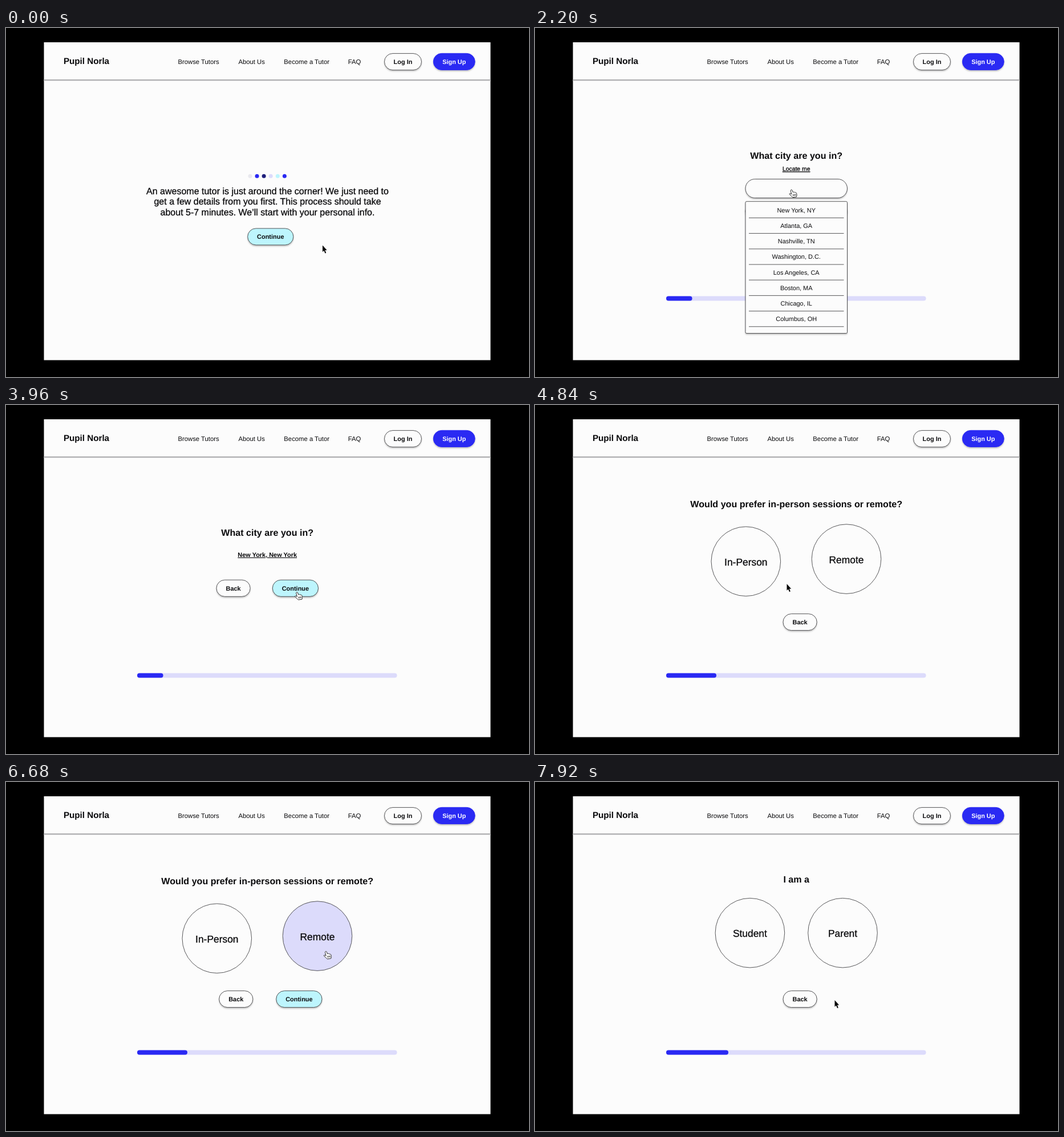
An HTML page for the animation above (8000 ms loop, 917 by 611 pixels).

```html
<!DOCTYPE html>
<html lang="en">
<head>
<meta charset="utf-8">
<title>Tutor sign-up flow</title>
<style>
html, body { margin: 0; width: 100%; height: 100%; overflow: hidden; background: #000; }
svg { display: block; width: 100%; height: 100%; font-family: "Liberation Sans", Arial, sans-serif; }
text { fill: #0a0a0c; text-anchor: middle; text-rendering: geometricPrecision; }
.bold { font-weight: 700; }
.medium { stroke: #0a0a0c; stroke-width: .3px; }
.under { text-decoration: underline; }
.line { stroke: #39393b; stroke-width: .85; }
</style>
</head>
<body>
<svg viewBox="0 0 917 611" xmlns="http://www.w3.org/2000/svg">
  <defs>
    <filter id="shadow" x="-20%" y="-20%" width="140%" height="150%">
      <feDropShadow dx="0" dy="1.8" stdDeviation="1" flood-color="#000" flood-opacity=".25"/>
    </filter>
  </defs>
  <rect width="917" height="611" fill="#000"/>
  <rect x="66.5" y="25" width="783" height="556.5" fill="#fcfcfc"/>
  <rect x="66.5" y="90" width="783" height="2" fill="#b0b0b2"/>
  <rect x="66.5" y="92" width="783" height="1" fill="#e2e2e3"/>
  <g id="header"></g>
  <g id="scenes"></g>
  <g id="cursor">
    <path id="arrow" d="M0 0V11.6L2.5 9.3L4.5 14L6.3 13.2L4.4 8.6H7.7Z" fill="#050505" stroke="#fff" stroke-width=".8" paint-order="stroke"/>
    <path id="hand" d="M-1.5 .8C-.8 -.3 .6 0 1 1.2L2.2 4.5C3 3.8 4 4 4.4 4.7C5.2 4.1 6.2 4.4 6.5 5.2C7.6 4.8 8.4 5.5 8.6 6.6L9 9C9.2 10.3 8.7 11 8.5 12.6L2 13.6C.6 11.6 -1.6 10.4 -3.4 8.6C-4.6 7.4 -3.3 6.1 -2 6.9L-.2 8L-1.7 2.4Z M2.4 8.2L3 11.2M4.5 7.9L5 10.9M6.5 7.7L7 10.6" fill="#fff" stroke="#111" stroke-width=".9" stroke-linejoin="round"/>
  </g>
</svg>
<script>
const $ = id => document.getElementById(id);
const BLUE = '#2a29f3', LILAC = '#dcdbfb', AQUA = '#bdf5fd', PAPER = '#fcfcfc', INK = '#0a0a0c';
const LOOP = 8000, TRAVEL = 480;
const MID = 458.2, SMALL = 10.95, NAV = 11.3, LARGE = 16.1, CHOICE = 17.4;

let hot = []; // clickable areas of the scene being built

// y is the middle of the capital letters
const label = (s, x, y, size, cls = '', ink = INK) =>
  `<text x="${x}" y="${y + size * .358}" font-size="${size}" class="${cls}" style="fill:${ink}">${s}</text>`;

const box = (x, y, w, h, r, fill = PAPER) =>
  `<rect class="line" x="${x}" y="${y}" width="${w}" height="${h}" rx="${r}" fill="${fill}"
    ${fill === BLUE ? `style="stroke:${BLUE}"` : ''} filter="url(#shadow)"/>`;

const button = (x, y, w, h, fill) => {
  hot.push([x, y, w, h]);
  return box(x, y, w, h, h / 2, fill);
};

const pill = (s, x, y, w, fill, ink) =>
  button(x, y, w, 29, fill) + label(s, x + w / 2, y + 14.6, SMALL, 'bold', ink);

const back = (x, y) => pill('Back', x, y, 59.2);
const next = (x, y) => pill('Continue', x, y, 80.2, AQUA);
const heading = (s, y) => label(s, MID, y, LARGE, 'bold');

const choice = (s, x, y, fill = 'none') => {
  const r = 60.8;
  hot.push([x - r, y - r, 2 * r, 2 * r]);
  return `<circle class="line" cx="${x}" cy="${y}" r="${r}" fill="${fill}"/>` +
    label(s, x, y + .8, CHOICE, 'medium');
};

const strip = (w, fill) => `<rect x="230" y="469.6" width="${w}" height="8" rx="4" fill="${fill}"/>`;
const bar = done => strip(455.6, LILAC) + strip(done, BLUE);

const intro = () =>
  ['#e9e9ee', BLUE, '#20207c', LILAC, AQUA, BLUE].map((c, i) =>
    `<circle cx="${428 + i * 12.08}" cy="259.3" r="3.5" fill="${c}"/>`).join('') +
  ['An awesome tutor is just around the corner! We just need to',
   'get a few details from you first. This process should take',
   'about 5-7 minutes. We’ll start with your personal info.'
  ].map((s, i) => label(s, MID + .3, 285 + i * 18.5, 16, 'medium')).join('') +
  next(423.7, 350.9);

const city = body => heading('What city are you in?', 223.7) + bar(45.6) +
  back(369, 306.3) + next(467.3, 306.3) + body;

const field = () => label('Locate me', MID, 246.5, 10.4, 'medium under') + button(369, 264.5, 178.5, 33);

const menu = () => box(369, 303.7, 178.5, 230.8, 2) +
  ['New York, NY', 'Atlanta, GA', 'Nashville, TN', 'Washington, D.C.',
   'Los Angeles, CA', 'Boston, MA', 'Chicago, IL', 'Columbus, OH'].map((s, i) => {
    const y = 318.8 + i * 27.2;
    return label(s, MID, y, SMALL) + `<path class="line" d="M375 ${y + 13.6}H541.5"/>`;
  }).join('');

const mode = fill => heading('Would you prefer in-person sessions or remote?', 173.6) + bar(88) +
  choice('In-Person', 369.8, 273.8) + choice('Remote', 546, 269.6, fill);

const role = () => heading('I am a', 170.6) + bar(109) +
  choice('Student', 376.9, 264.2) + choice('Parent', 539.5, 264.2) + back(435, 365.6);

const header = () =>
  label('Pupil Norla', 141, 58, 15.2, 'bold') +
  label('Browse Tutors', 337.5, 59.3, NAV) +
  label('About Us', 430.7, 59.3, NAV) +
  label('Become a Tutor', 527.2, 59.3, NAV) +
  label('FAQ', 611, 59.3, NAV) +
  pill('Log In', 663.5, 44.6, 65) +
  pill('Sign Up', 749.3, 44.4, 73, BLUE, '#fff');

const scenes = [
  [0, intro],
  [920, () => city(field())],
  [2120, () => city(field() + menu())],
  [3360, () => city(label('New York, New York', MID, 262, SMALL, 'bold under'))],
  [4320, () => mode() + back(435, 365.6)],
  [6320, () => mode(LILAC) + back(373.7, 365.6) + next(473.8, 365.6)],
  [7480, role]
].map(([at, build]) => {
  hot = [];
  return { at, art: build(), hot };
});

// each move: start time and the point the pointer glides to
const moves = [
  [-TRAVEL, 555, 380.5], [120, 455, 371.5], [1240, 450, 283], [2300, 448, 319],
  [3400, 510.5, 327.5], [4440, 436, 312], [5000, 561.3, 296.3], [6840, 522, 378], [7440, 525.5, 382]
];

function pointer(t) {
  const i = moves.findLastIndex(m => m[0] <= t);
  const [at, x, y] = moves[i], [, fx, fy] = moves[Math.max(0, i - 1)];
  const p = Math.min(1, (t - at) / TRAVEL), e = p * p * (3 - 2 * p);
  return [fx + (x - fx) * e, fy + (y - fy) * e];
}

$('header').innerHTML = header();
$('scenes').innerHTML = scenes.map(s => `<g>${s.art}</g>`).join('');
const groups = [...$('scenes').children];
const show = (el, on) => el.setAttribute('display', on ? 'inline' : 'none');

function draw(t) {
  const now = scenes.findLastIndex(s => s.at <= t);
  groups.forEach((g, i) => show(g, i === now));
  const [x, y] = pointer(t);
  const over = scenes[now].hot.some(([l, top, w, h]) => x > l && x < l + w && y > top && y < top + h);
  $('cursor').setAttribute('transform', `translate(${x} ${y})`);
  show($('arrow'), !over);
  show($('hand'), over);
}

let start;
function tick(time) {
  start ??= time;
  draw((time - start) % LOOP);
  requestAnimationFrame(tick);
}
draw(0);
requestAnimationFrame(tick);
</script>
</body>
</html>
```
